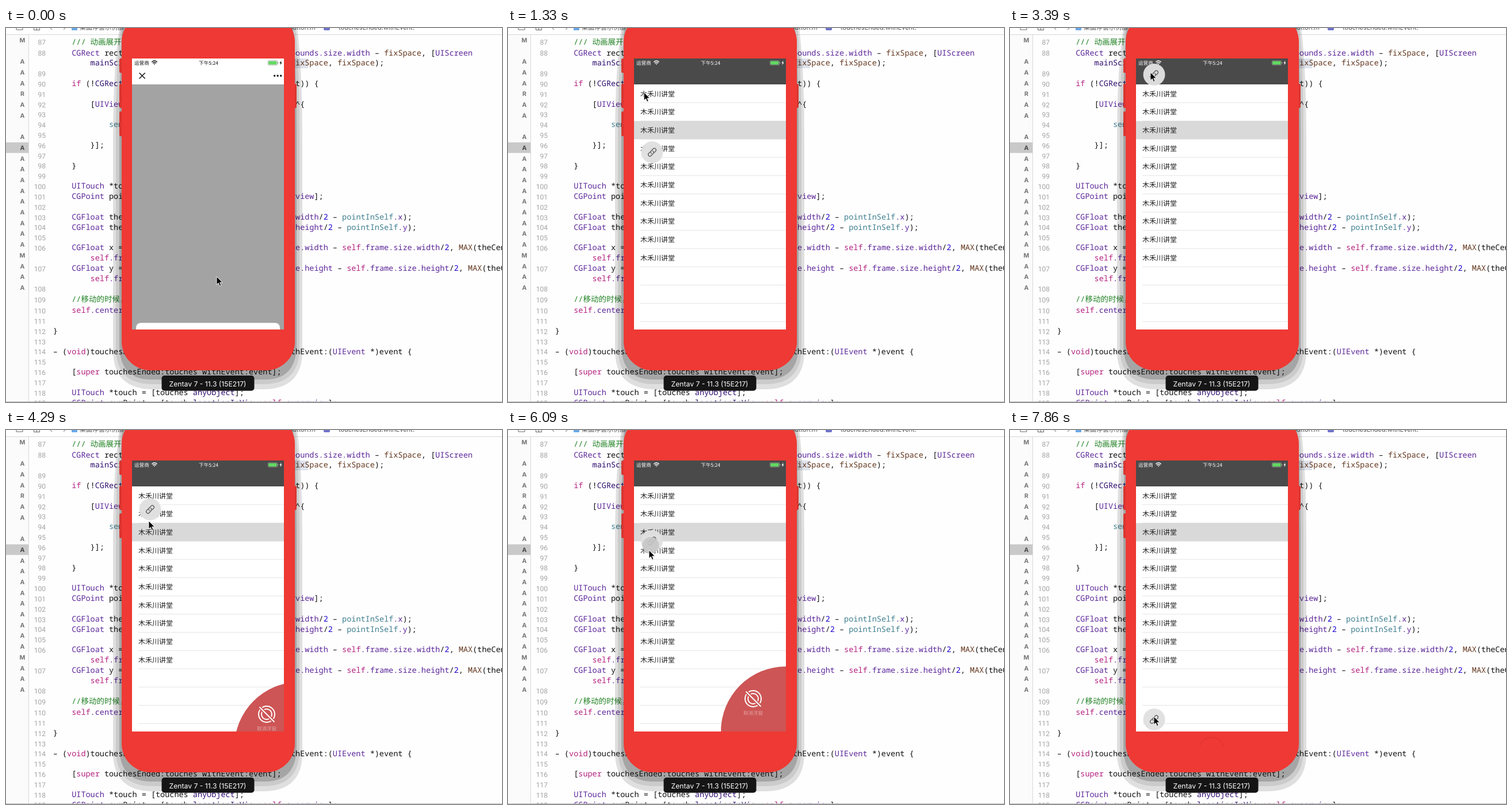
An HTML page for the animation above (8 s loop, 862 px wide and 650 px high).

```html
<!DOCTYPE html>
<html lang="zh">
<head>
<meta charset="utf-8">
<title>Floating ball demo</title>
<style>
  html, body { margin: 0; width: 100%; height: 100%; overflow: hidden; background: #fff; }
  svg { display: block; width: 100vw; height: 100vh; }
  text { white-space: pre; text-rendering: geometricPrecision; }
  .code { font: 13.5px "Noto Sans Mono", "Noto Sans CJK SC", "Noto Sans CJK", monospace; fill: #111; }
  .num { font: 12px Roboto, sans-serif; fill: #a3a3a3; text-anchor: end; }
  .mark { font: bold 10.5px Inter, sans-serif; fill: #737373; text-anchor: middle; }
  .ui { font-family: "Noto Sans CJK SC", "Noto Sans CJK", sans-serif; }
  .bar { font: 11px Inter, "Noto Sans CJK SC", sans-serif; fill: #555; }
  .tip { font: 12.2px Inter, sans-serif; fill: #fff; text-anchor: middle; }
</style>
</head>
<body>
<svg viewBox="0 0 862 650">
  <defs>
    <clipPath id="screen"><rect x="219" y="53" width="264" height="471"/></clipPath>
  </defs>
  <rect width="862" height="650" fill="#fefefe"/>

  <rect width="39" height="650" fill="#fbfbfb"/>
  <rect y="198.7" width="39" height="18.5" fill="#c9c9c9"/>
  <g id="marks"></g>
  <path d="M39.5 11V650" stroke="#d9d9d9"/>

  <rect x="495" y="53" width="30" height="17" fill="#dfe3ec"/>
  <g id="code"></g>

  <rect width="862" height="11" fill="#fff"/>
  <path d="M0 11.5H862" stroke="#d8d8d8"/>
  <g fill="none" stroke="#666">
    <path d="M18 -2V3H29V-2M48.5 -3V3.5H58.5V-3M53.5 -3V3.5M80 -3L77 0L80 3M100 -3L103 0L100 3"/>
  </g>
  <rect x="114" y="-6" width="10" height="10" rx="1" fill="#6aa9e8"/>
  <text class="bar" x="128" y="3">桌面浮窗示例部</text>
  <text class="bar" x="538" y="3" text-anchor="end">Button.m</text>
  <rect x="552" y="-7" width="11" height="11" rx="2" fill="#6f73c9"/>
  <text class="bar" x="573" y="3">-touchesEnded:withEvent:</text>
  <path d="M0 649.5H862" stroke="#bdbdbd"/>

  <g fill="#000">
    <path fill-opacity=".12" d="M197 0Q186 70 186 200V560Q186 628 256 628H446Q516 628 515 560V200Q515 70 506 0Z"/>
    <path fill-opacity=".09" d="M199 0Q191 70 191 200V556Q191 619 254 619H448Q510 619 510 556V200Q510 70 503 0Z"/>
    <path fill-opacity=".19" d="M202 0Q197 70 197 200V550Q197 611 252 611H450Q505 611 505 550V200Q505 70 499 0Z"/>
  </g>
  <g fill="#d93631">
    <rect x="197" y="53" width="8" height="25" rx="2"/>
    <rect x="197" y="97" width="8" height="42" rx="2"/>
    <rect x="197" y="145" width="8" height="43" rx="2"/>
    <rect x="498" y="97" width="7" height="42" rx="2"/>
  </g>
  <rect x="201" y="-26" width="301" height="621" rx="50" fill="#ee3934"/>
  <path id="home" d="M330 548A22 22 0 0 1 371 548" fill="none" stroke="#d8322e"/>

  <g clip-path="url(#screen)">
    <rect x="219" y="53" width="264" height="471" fill="#fff"/>
    <g id="list">
      <rect x="219" y="53" width="264" height="45" fill="#4a4a4a"/>
      <rect x="219" y="161.7" width="264" height="31.7" fill="#d9d9d9"/>
    </g>
    <rect id="dim" x="219" y="53" width="264" height="471"/>
    <g id="page">
      <rect x="215" y="53" width="4" height="471" fill-opacity=".06"/>
      <rect x="219" y="53" width="264" height="45" fill="#fff"/>
      <rect id="body" x="219" y="98" width="264" height="426"/>
      <path d="M231.7 78L241.7 88M241.7 78L231.7 88" stroke="#111" stroke-width="1.5"/>
      <g fill="#111"><circle cx="466.7" cy="83" r="1.7"/><circle cx="472.2" cy="83" r="1.7"/><circle cx="477.7" cy="83" r="1.7"/></g>
      <rect id="card" x="226" width="250" height="60" rx="8" fill="#fff"/>
    </g>
    <g id="status" class="ui" font-size="8.6">
      <text x="223" y="63.6">运营商</text>
      <g fill="none" stroke="currentColor" stroke-width="1.4">
        <path d="M253.3 59.2Q258 55 262.7 59.2M255 61.2Q258 58.6 261 61.2"/>
        <path d="M256.7 62L258 64L259.3 62Z" fill="currentColor" stroke="none"/>
      </g>
      <text x="352" y="63.6" text-anchor="middle">下午5:24</text>
      <rect x="455.4" y="56.9" width="16.4" height="7.4" rx="1.6" fill="none" stroke="currentColor" stroke-width=".7" stroke-opacity=".5"/>
      <rect x="456.3" y="57.8" width="14.2" height="5.6" rx=".8" fill="#62d962"/>
      <path d="M472.6 59.4V61.8" stroke="currentColor" stroke-opacity=".5"/>
      <path d="M478.6 56.6L475.4 61H477.2L476.4 64.6L479.6 60H477.8Z"/>
    </g>
    <g id="cancel">
      <circle cx="483" cy="524" r="113" fill="#cd5555"/>
      <g fill="none" stroke="#fff" stroke-width="2">
        <circle cx="426" cy="467" r="14"/><circle cx="426" cy="467" r="9"/>
        <path d="M414.5 455.5L438.5 479.5" stroke="#cd5555" stroke-width="5.5"/>
        <path d="M413.5 454.5L439.5 480.5"/>
      </g>
      <text class="ui" x="426" y="495" font-size="8.5" text-anchor="middle" fill="#fff" fill-opacity=".45">取消浮窗</text>
    </g>
    <g id="ball">
      <circle r="19" fill="#e1e1e1" fill-opacity=".97"/>
      <g transform="rotate(-45)" fill="none" stroke="#666" stroke-width="1.5">
        <path d="M-1.5 -2.9H-5.5A2.9 2.9 0 0 0 -5.5 2.9H-.5A2.9 2.9 0 0 0 2.2 -1"/>
        <path d="M1.5 2.9H5.5A2.9 2.9 0 0 0 5.5 -2.9H.5A2.9 2.9 0 0 0 -2.2 1"/>
      </g>
      <circle id="press" r="14.5" fill="#c6c6c6" fill-opacity=".9"/>
    </g>
  </g>

  <rect x="270.5" y="604" width="161" height="26.5" rx="5" fill="#151515"/>
  <text class="tip" x="350.5" y="622.6">Zentav 7 - 11.3 (15E217)</text>

  <path id="cursor" d="M0 0V14.2L3.3 11.1L5.5 16.4L7.9 15.4L5.7 10.2H10.2Z" stroke="#fff" stroke-width=".9"/>
</svg>
<script>
const $ = id => document.getElementById(id);
const add = (id, html) => $(id).insertAdjacentHTML('beforeend', html);

// Code listing: an empty number marks a wrapped line.
const source = `87|    /// 动画展开
88|    CGRect rect = CGRectMake([UIScreen mainScreen].bounds.size.width – fixSpace, [UIScreen
|        mainScreen].bounds.size.height – fixSpace, fixSpace, fixSpace);
89|
90|    if (!CGRectIntersectsRect(self.frame, currentRect)) {
91|
92|        [UIView animateWithDuration:0.25 animations:^{
93|
94|            semiCircle.frame = rect;
95|
96|        }];
97|
98|    }
99|
100|    UITouch *touch = [touches anyObject];
101|    CGPoint point = [touch locationInView:self.superview];
102|
103|    CGFloat theCenterX = point.x + (self.frame.size.width/2 – pointInSelf.x);
104|    CGFloat theCenterY = point.y + (self.frame.size.height/2 – pointInSelf.y);
105|
106|    CGFloat x = MIN([UIScreen mainScreen].bounds.size.width – self.frame.size.width/2, MAX(theCenterX,
|        self.frame.size.width/2));
107|    CGFloat y = MIN([UIScreen mainScreen].bounds.size.height – self.frame.size.height/2, MAX(theCenterY,
|        self.frame.size.height/2));
108|
109|    //移动的时候，
110|    self.center = CGPointMake(x, y);
111|
112|}
113|
114|– (void)touchesEnded:(NSSet<UITouch *> *)touches withEvent:(UIEvent *)event {
115|
116|    [super touchesEnded:touches withEvent:event];
117|
118|    UITouch *touch = [touches anyObject];
119|    CGPoint curPoint = [touch locationInView:self.superview];`;

const palette = [
  [/^(self|super|if|void)$/, '#b4217f'],
  [/^(CG(Rect|Point|Float)|UI\w+|NSSet)$/, '#5c2699'],
  [/^(fixSpace|MAX|MIN)$/, '#643820'],
  [/^(anyObject|locationInView|mainScreen|animat\w+|CGRect\w+|CGPointMake)$/, '#2e0d6e'],
  [/^(pointInSelf|semiCircle)$/, '#3f7f8f'],
  [/^\d/, '#1c00cf'],
  [/^\.(bounds|size|width|height|frame|center|x|y)$/, '#5c2699'],
  [/^superview$/, '#5c2699']
];
const esc = s => s.replace(/</g, '&lt;').replace(/>/g, '&gt;');
const tint = (s, c) => `<tspan fill="${c}">${s}</tspan>`;

function paint(line) {
  if (line.trim().startsWith('//')) return tint(line, '#1f8022');
  return line.split(/(\.?\w+)/).map(word => {
    const hit = palette.find(([re]) => re.test(word) || re.test(word.slice(1)) && word[0] === '.');
    return hit ? tint(word, hit[1]) : esc(word);
  }).join('');
}

let y = 24;
for (const row of source.split('\n')) {
  const [, no, line] = row.match(/^(\d*)\|(.*)$/);
  if (no === '88') y = 43;
  if (no === '109' || no === '110') y += 1.1;
  add('code', `<text class="num" x="69" y="${y + 5.4}">${no}</text>` +
    `<text class="code" x="81.8" y="${y + 4.6}">${paint(line)}</text>`);
  y += 17.82;
}

[...'M AAARAA ' + 'A'.repeat(11) + 'MAAA'].forEach((c, i) =>
  add('marks', `<text class="mark" x="28.5" y="${24.8 + 18.7 * i}"${i === 10 ? ' style="fill:#444"' : ''}>${c}</text>`));

for (let i = 0; i < 13; i++) {
  const top = 98.3 + 31.7 * i;
  add('list', `<path d="M230 ${top + 31.5}H483" stroke="#e1e1e1" stroke-width=".9"/>`);
  if (i < 10) add('list', `<text class="ui" x="230" y="${top + 20.2}" font-size="12" fill="#1c1c1c">木禾川讲堂</text>`);
}

// Tracks: [step, value...], linear in between.
const STEPS = 54, LOOP = 8000;
const cursor = [[0, 366, 432], [1, 350, 390], [4, 234, 79], [8, 234, 79], [12, 243, 210], [13, 243, 208],
  [15, 241, 112], [18, 244, 74], [22, 244, 74], [23, 244, 77], [24, 245, 80], [28, 248, 158], [29, 248, 158],
  [31, 246, 138], [38, 246, 138], [41, 245, 209], [46, 248, 262], [47, 248, 268], [51, 250, 498]];
const ball = [[6, 240, 216], [7, 250.5, 216], [13, 250.5, 216], [15, 242.5, 115], [18, 248, 81], [20, 250.5, 81],
  [24, 250.5, 81], [28, 250.5, 138], [38, 250.5, 138], [41, 250, 193], [46, 250.5, 254], [47, 250.5, 262], [51, 250.5, 503]];
const corner = [[13, 115], [14, 50], [15, 3], [16, 0], [19, 0], [21, 115], [24, 115], [25, 20], [26, 0], [28, 0],
  [29, 27], [30, 85], [31, 115], [38, 115], [39, 40], [40, 0], [50, 0], [51, 30], [52, 115]];
const slide = [[5, 0], [6, 166], [7, 243], [8, 264]];
const sheet = [[0, 512.5], [1, 521], [2, 526]];
const grey = [[0, 163], [2, 170]];

function at(track, k) {
  const i = track.findIndex(p => p[0] > k);
  if (i === 0) return track[0].slice(1);
  if (i < 0) return track[track.length - 1].slice(1);
  const a = track[i - 1], b = track[i], f = (k - a[0]) / (b[0] - a[0]);
  return a.slice(1).map((v, j) => v + (b[j + 1] - v) * f);
}
const move = (id, x, y) => $(id).setAttribute('transform', `translate(${x} ${y})`);
const show = (id, on) => $(id).style.display = on ? '' : 'none';

function draw(k) {
  const [shift] = at(slide, k), left = 1 - shift / 264;
  move('page', shift, 0);
  show('page', left > 0);
  move('list', -79.2 * left, 0);
  $('dim').setAttribute('fill-opacity', .1 * left);
  $('card').setAttribute('y', at(sheet, k)[0]);
  const [g] = at(grey, k);
  $('body').setAttribute('fill', `rgb(${g},${g},${g})`);

  const ink = k < 6 ? '#111' : '#fff';
  $('status').setAttribute('fill', ink);
  $('status').style.color = ink;

  const [d] = at(corner, k);
  move('cancel', d, d);
  move('ball', ...at(ball, k));
  show('ball', k > 5);
  show('press', k > 32 && k < 44);
  move('press', k < 39 ? -1 : -2, k < 39 ? .5 : 7.5);
  move('cursor', ...at(cursor, k));
  show('home', k > 50);
}

const start = performance.now();
let last = -1;
function tick() {
  const t = (performance.now() - start) % LOOP;
  const k = Math.min(STEPS - 1, Math.floor((t + 20) * STEPS / LOOP));
  if (k !== last) draw(last = k);
  requestAnimationFrame(tick);
}
tick();
</script>
</body>
</html>
```
